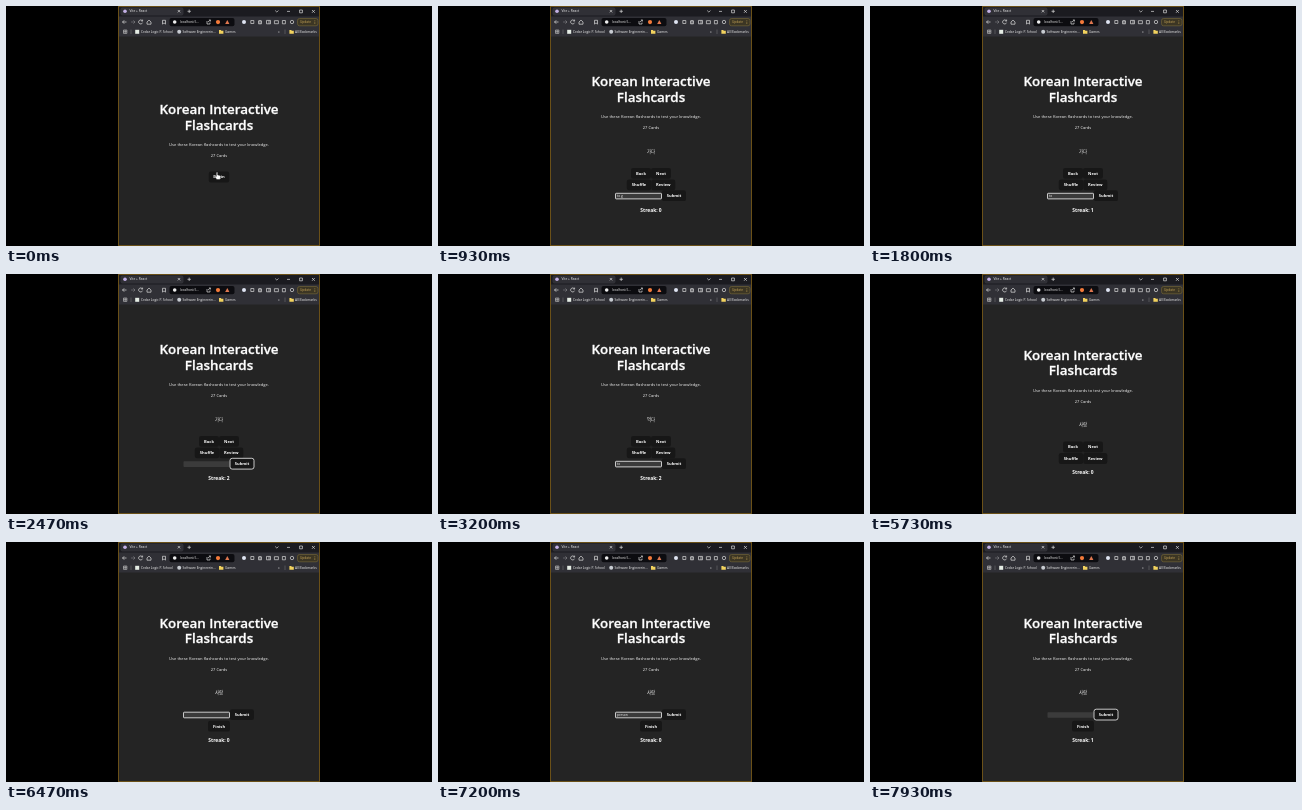
Animation, 426 px wide and 240 px high, one loop 8000 ms. Source, as an HTML page:

```html
<!DOCTYPE html>
<html lang="en">
<head>
<meta charset="utf-8">
<title>Korean flashcards</title>
<style>
  html, body { margin: 0; width: 100%; height: 100%; overflow: hidden; background: #000; }
  svg { display: block; width: 100vw; height: 100vh; }
  text { font-family: "Open Sans", "Noto Sans", sans-serif; fill: #f4f4f4; }
  .small { font-size: 3.25px; }
  .mid { text-anchor: middle; }
  .body { font-size: 4.1px; }
  .bold { font-weight: 700; fill: #fff; }
  .title { font-size: 13.4px; font-weight: 600; stroke: #fff; stroke-width: .3; }
  .ko { font-family: "Noto Sans CJK KR", "Noto Sans CJK", sans-serif; font-size: 4.4px; }
  .line { fill: none; stroke: #dcdcdc; stroke-width: .7; }
</style>
</head>
<body>
<svg viewBox="0 0 426 240">
  <rect width="426" height="240"/>
  <rect x="112" width="202" height="240" fill="#242424"/>

  <g id="chrome">
    <rect x="112" width="202" height="11" fill="#1b1b20"/>
    <rect x="112" y="10.5" width="202" height="20" fill="#303036"/>
    <rect x="114.5" y="1.5" width="63" height="8" rx="2" fill="#303036"/>
    <circle cx="119" cy="5.2" r="1.8" fill="#c3b0e6"/>
    <text class="small" x="123.5" y="6.4">Vite + React</text>
    <path class="line" d="M171.8 4l2.4 2.4m0-2.4l-2.4 2.4M181.5 5.3h3.4m-1.7-1.7v3.4M269.2 4.5l1.6 1.6 1.6-1.6M281 5.4h3M293.6 4h2.8v2.8h-2.8zM306 4l2.8 2.8m0-2.8L306 6.8"/>

    <path class="line" d="M120.5 16h-4m1.7-1.7L116.5 16l1.7 1.7M156.5 14.3h3v3.8l-1.5-1.2-1.5 1.2z"/>
    <path class="line" d="M125 16h4m-1.7-1.7L129 16l-1.7 1.7" opacity=".4"/>
    <path class="line" d="M136.4 15a2 2 0 1 0 .1 1.7M136.6 13.6V15h-1.4M141 16l2-1.9 2 1.9v2.2h-4z"/>
    <rect x="163.5" y="12" width="65" height="8.2" rx="2" fill="#0c0c10"/>
    <circle cx="168.7" cy="16" r="1.8" fill="#eee"/>
    <text class="small" x="174" y="17.3">localhost:5...</text>
    <path class="line" d="M201 15v3h3v-1.5M202 16l2.4-2m-1.5 0h1.5v1.5"/>
    <circle cx="212" cy="16.1" r="2.1" fill="#f47a3a"/>
    <path d="M221.3 14l2.1 4h-4.2z" fill="#e07850"/>
    <circle cx="238" cy="16" r="2" fill="#dfe4f2"/>
    <path class="line" d="M244.8 14.5h3v3h-3zM252.5 14.8h3v3h-3zm1.5-.8v4M260.5 14.4h4v3.4h-4zm2.5 0v3.4M268.4 14.7h4v3h-4zM276.4 14.5h3v3.3h-3z"/>
    <circle class="line" cx="286" cy="16" r="1.7"/>
    <rect x="291.5" y="12.5" width="20.5" height="7.3" rx="2" fill="#3c3624" stroke="#857338" stroke-width=".5"/>
    <text class="small" x="294" y="17.3" style="fill:#c9a658">Update</text>
    <path d="M308.8 14.5v3.5" stroke="#c9a658" stroke-width=".7" stroke-dasharray=".7 .7"/>

    <path class="line" d="M117.5 24h3.4v3.4h-3.4zm1.7 0v3.4m-1.7-1.7h3.4" opacity=".75"/>
    <path class="line" d="M125 23.5v4.5M279 23.5v4.5" opacity=".3"/>
    <rect x="129.2" y="23.8" width="4" height="4" fill="#e4ece4"/>
    <text class="small" x="135" y="26.9">Cedar Logic P. School</text>
    <circle cx="173.2" cy="25.8" r="2" fill="#c8ccd2"/>
    <text class="small" x="176.5" y="26.9">Software Engineerin...</text>
    <path d="M213 24h1.8l.6.7h2v3H213zM283.4 24h1.8l.6.7h2v3h-4.4z" fill="#f2d25e"/>
    <text class="small" x="219" y="26.9">Games</text>
    <text class="small" x="272" y="26.9">»</text>
    <text class="small" x="289" y="26.9">All Bookmarks</text>
  </g>
  <rect x="112.5" y=".5" width="201" height="239" fill="none" stroke="#6a5018" stroke-width="1"/>

  <g id="page">
    <text class="mid bold title" x="213" y="80.3">Korean Interactive</text>
    <text class="mid bold title" x="213" y="95.6">Flashcards</text>
    <text class="mid body" x="213" y="112.2">Use these Korean flashcards to test your knowledge.</text>
    <text class="mid body" x="213" y="123.2">27 Cards</text>
    <text id="card" class="mid ko" x="213" y="146.6"></text>
    <g id="begin"></g>
    <g id="nav"></g>
    <g id="answer">
      <rect id="box" x="177.5" y="-2.8" width="46" height="5.6" rx=".7" fill="#3b3b3b"/>
      <text id="typed" class="small" x="179" y="1.1"></text>
    </g>
    <g id="finish"></g>
    <text id="streak" class="mid bold" x="213" font-size="4.9"></text>
  </g>
  <path id="hand" d="M210.3 166.5q.9-.8 1.4.1v2.3l2.2.5q1 .3.8 1.4l-.7 2.8h-3.2l-2-2.8q0-1 1-.6l.5.4z" fill="#fff" stroke="#111" stroke-width=".4"/>
</svg>
<script>
const $ = id => document.getElementById(id);
const LOOP = 8000;

function addButton(group, label, x, y, width) {
  $(group).insertAdjacentHTML('beforeend',
    `<rect x="${x - width / 2}" y="${y - 5.4}" width="${width}" height="10.8" rx="2.2" fill="#171717"/>
     <text class="mid body bold" x="${x}" y="${y + 1.4}">${label}</text>`);
}
addButton('begin', 'Begin', 213, 143, 20.5);
addButton('nav', 'Back', 203, 167.4, 20);
addButton('nav', 'Next', 223, 167.4, 20);
addButton('nav', 'Shuffle', 201, 178.9, 24.4);
addButton('nav', 'Review', 225.3, 178.9, 24);
addButton('answer', 'Submit', 236, -.4, 24);
addButton('finish', 'Finish', 213, 178.6, 22);
const submitBox = $('answer').querySelectorAll('rect')[1];

// Vertical offset, answer row and streak baseline of each view
const views = {
  intro:  { shift: 28,  parts: ['begin', 'hand'] },
  quiz:   { shift: 0,   parts: ['nav', 'answer', 'card', 'streak'], row: 190.1, streakY: 205.8 },
  browse: { shift: 5.6, parts: ['nav', 'card', 'streak'], streakY: 194.8 },
  review: { shift: 5.6, parts: ['answer', 'finish', 'card', 'streak'], row: 167.4, streakY: 194.8 }
};
const parts = ['begin', 'hand', 'nav', 'answer', 'finish', 'card', 'streak'];

// start, view, card, streak, answer, typing start, focused control
const steps = [
  [0,    'intro'],
  [400,  'quiz', '가다', 0, 'to go', 650, 'box'],
  [1330, 'quiz', '가다', 1, '', 0, 'submit'],
  [1530, 'quiz', '가다', 1, 'to go', 1660, 'box'],
  [2400, 'quiz', '가다', 2, '', 0, 'submit'],
  [2800, 'quiz', '먹다', 2, 'to eat', 3070, 'box'],
  [3800, 'quiz', '먹다', 3, '', 0, 'submit'],
  [4130, 'quiz', '사랑', 3, 'love', 4200, 'box'],
  [5000, 'browse', '사람', 0],
  [6130, 'review', '사람', 0, 'person', 6600, 'box'],
  [7400, 'review', '사람', 1, '', 0, 'submit']
];

function outline(el, on) {
  el.setAttribute('stroke', on ? '#f2f2f2' : 'none');
  el.setAttribute('stroke-width', .8);
}

function render(time) {
  const t = time % LOOP;
  const [, name, card = '', streak = 0, answer = '', typeAt = 0, focus] = steps.findLast(s => s[0] <= t);
  const view = views[name];
  for (const id of parts) $(id).style.display = view.parts.includes(id) ? '' : 'none';
  $('page').setAttribute('transform', `translate(0 ${view.shift})`);
  $('answer').setAttribute('transform', `translate(0 ${view.row || 0})`);
  $('streak').setAttribute('y', view.streakY || 0);
  $('card').textContent = card;
  $('streak').textContent = `Streak: ${streak}`;
  $('typed').textContent = answer.slice(0, Math.max(0, Math.ceil((t - typeAt) / 90)));
  outline($('box'), focus === 'box');
  outline(submitBox, focus === 'submit');
}

function tick() {
  render(performance.now());
  requestAnimationFrame(tick);
}
tick();
</script>
</body>
</html>
```
